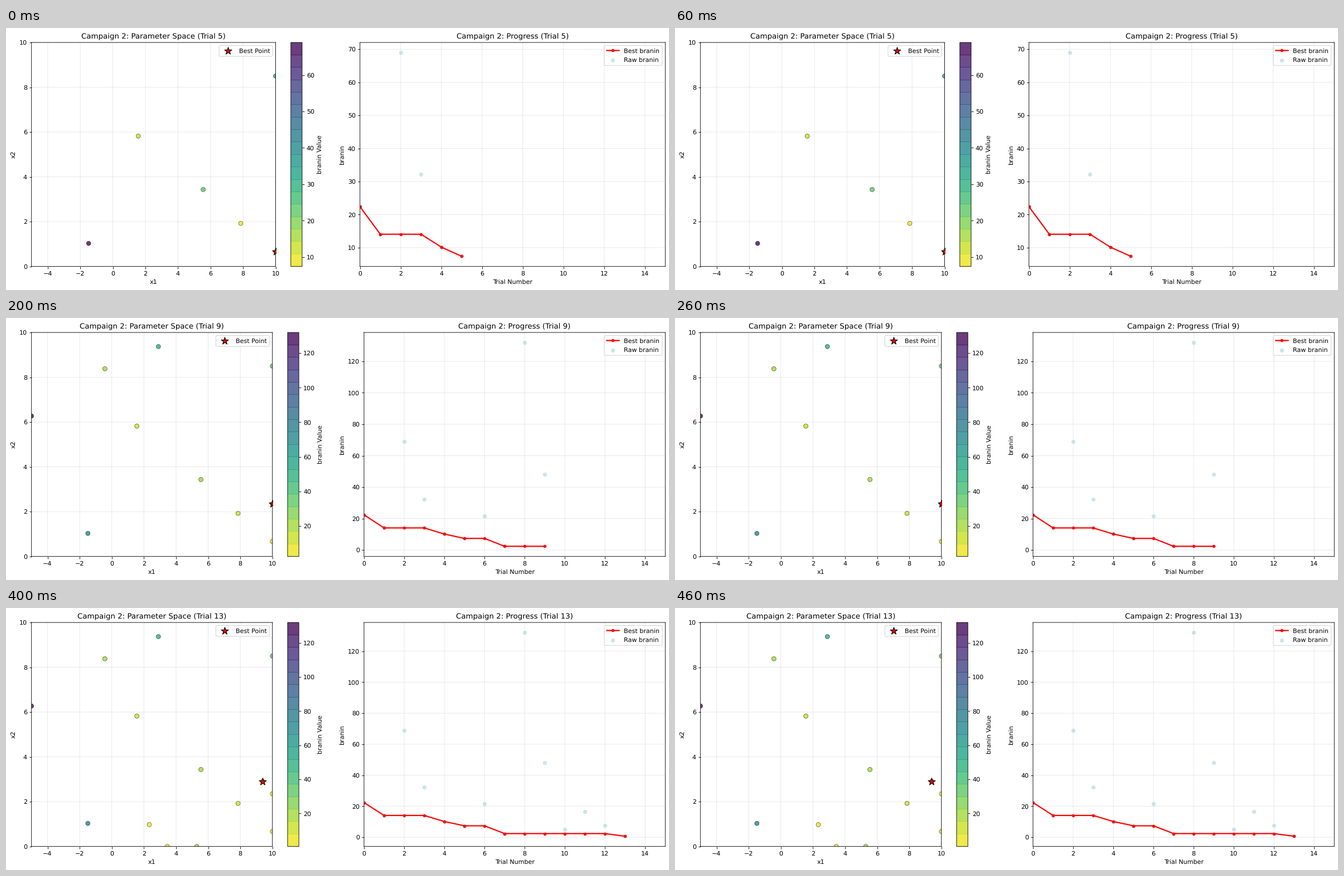
These frames come from a looping animation (1189 by 471 pixels, 0.5 s). A matplotlib script:

```python
import numpy as np
import matplotlib.pyplot as plt
from matplotlib.animation import FuncAnimation
from matplotlib.colors import ListedColormap

W, H, DPI = 1189, 471, 80
TOP, BOTTOM = 26, 428.7
FIRST_TRIAL, STEP, FRAMES = 5, 2, 5

# Unhinted text and unsnapped lines keep subpixel placement
plt.rcParams.update({
    "font.family": "DejaVu Sans",
    "text.hinting": "none",
    "path.snap": False,
})

# Sampled parameters (x1, x2), one row per trial
POINTS = np.array([
    (5.55, 3.435), (1.56, 5.82), (-1.49, 1.03), (10, 8.5), (7.86, 1.925),
    (10, 0.67), (-0.43, 8.38), (10, 2.35), (-5, 6.27), (2.9, 9.37),
    (3.455, 0), (5.29, 0), (2.335, 0.975), (9.39, 2.91),
])


def branin(x1, x2):
    bowl = x2 - 5.1 * x1**2 / (4 * np.pi**2) + 5 * x1 / np.pi - 6
    return bowl**2 + 10 * (1 - 1 / (8 * np.pi)) * np.cos(x1) + 10


VALUES = branin(*POINTS.T)
BEST = np.minimum.accumulate(VALUES)

BANDS = 18
CMAP = ListedColormap(plt.get_cmap("viridis_r")((np.arange(BANDS) + 0.5) / BANDS))

fig = plt.figure(figsize=(W / DPI, H / DPI), dpi=DPI, facecolor="white")


def add_axes(left, right):
    """Axes between two pixel columns, sharing the common rows."""
    return fig.add_axes([left / W, 1 - BOTTOM / H,
                         (right - left) / W, (BOTTOM - TOP) / H])


def draw_space(ax, cax, n, trial):
    x, y = POINTS[:n].T
    dots = ax.scatter(x, y, c=VALUES[:n], cmap=CMAP, s=50, alpha=0.8,
                      edgecolors="black", linewidths=0.5)
    best = VALUES[:n].argmin()
    ax.scatter(x[best], y[best], c="red", s=150, marker="*",
               edgecolors="black", linewidths=1, label="Best Point", zorder=5)
    fig.colorbar(dots, cax=cax, label="branin Value")
    ax.set(xlim=(-5, 10), ylim=(0, 10), xlabel="x1", ylabel="x2",
           title=f"Campaign 2: Parameter Space (Trial {trial})")


def draw_progress(ax, n, trial):
    trials = np.arange(n)
    ax.plot(trials, BEST[:n], "r-o", lw=2, ms=4, label="Best branin")
    ax.scatter(trials, VALUES[:n], c="lightblue", s=30, alpha=0.6,
               label="Raw branin")
    ax.set(xlim=(0, 15), xlabel="Trial Number", ylabel="branin",
           title=f"Campaign 2: Progress (Trial {trial})")


def update(i):
    fig.clear()
    trial = FIRST_TRIAL + STEP * i
    n = trial + 1
    # Three-digit tick labels take room from the plots
    wide = VALUES[:n].max() >= 100
    space = add_axes(45.7, 477.8 if wide else 483.5)
    cax = add_axes(*((505, 525.2) if wide else (510.8, 531)))
    progress = add_axes(642 if wide else 634.8, 1182.3)
    draw_space(space, cax, n, trial)
    draw_progress(progress, n, trial)
    for ax in (space, progress):
        ax.grid(True, alpha=0.3)
        ax.legend(loc="upper right")
    return []


anim = FuncAnimation(fig, update, frames=FRAMES, init_func=lambda: [],
                     interval=100, repeat=True, repeat_delay=0)
plt.show()
```
